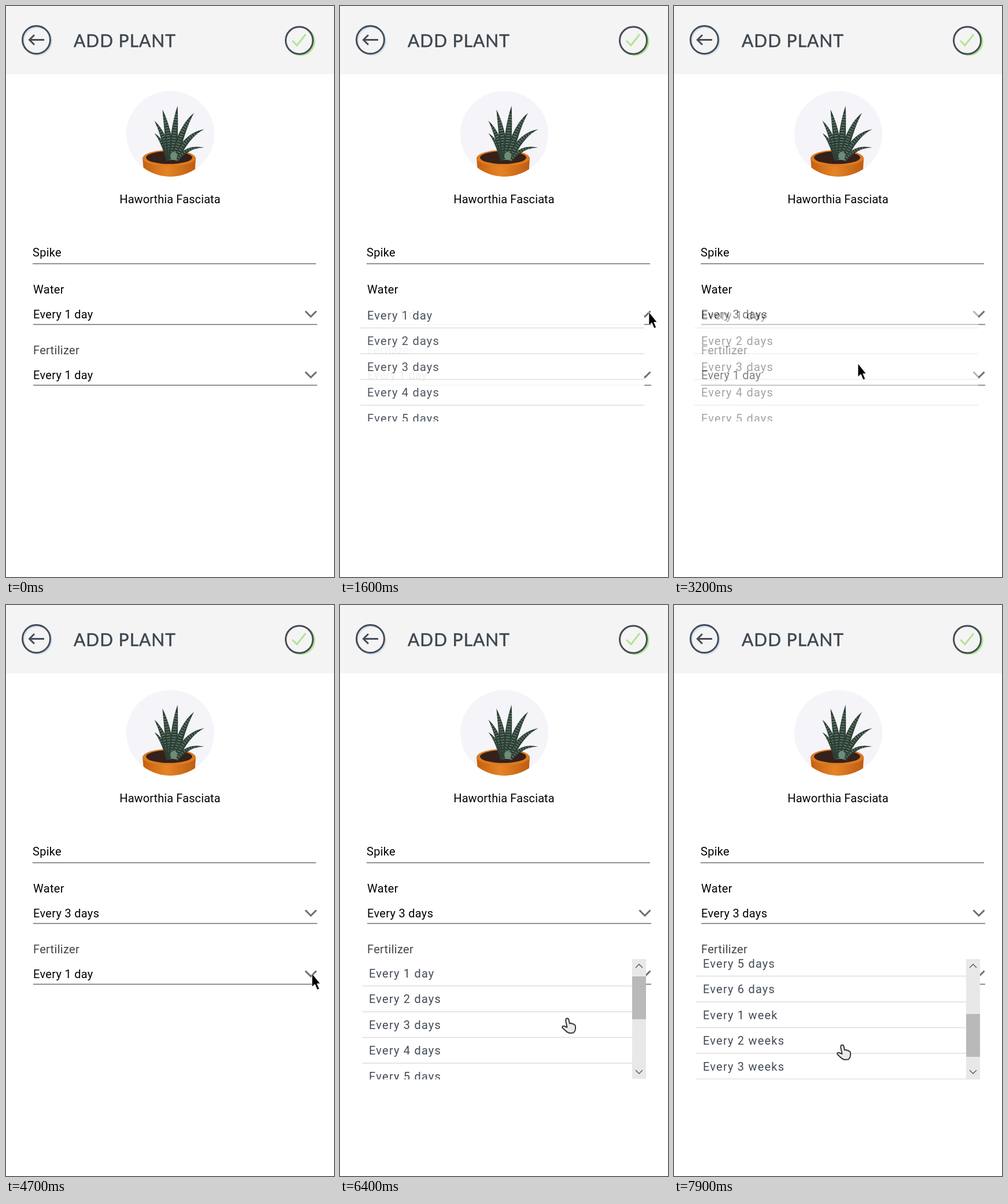
An HTML page for the animation above (8000 ms loop, 567x987 px).

```html
<!DOCTYPE html>
<html lang="en">
<head>
<meta charset="utf-8">
<title>Add plant</title>
<style>
  html, body { margin: 0; width: 100%; height: 100%; overflow: hidden; background: #fff; }
  svg { display: block; width: 100vw; height: 100vh; }
  text { font: 20px Roboto, sans-serif; letter-spacing: .3px; }
  .title { font: 30px Lato, sans-serif; letter-spacing: 1px; fill: #3e4751; stroke: #3e4751; stroke-width: .5; }
  .item { letter-spacing: 1.2px; fill: #434b55; }
  .icon { fill: none; stroke: #454d57; stroke-width: 3; }
  .underline { stroke: #6b6b6b; stroke-width: 1.5; }
  .chevron { fill: none; stroke: #6d6d6d; stroke-width: 3; }
  .bar path { fill: none; stroke: #555; stroke-width: 1.4; }
</style>
</head>
<body>
<svg viewBox="0 0 567 987">
  <defs>
    <clipPath id="photoClip"><ellipse cx="284" cy="221" rx="76" ry="74"/></clipPath>
    <clipPath id="listClip"><rect width="491" height="208"/></clipPath>
    <linearGradient id="clay">
      <stop offset="0" stop-color="#c4600f"/>
      <stop offset=".45" stop-color="#e58426"/>
      <stop offset="1" stop-color="#bd5c12"/>
    </linearGradient>
  </defs>

  <rect width="567" height="987" fill="#fff"/>
  <rect width="567" height="118" fill="#f4f4f4"/>
  <circle class="icon" cx="54.5" cy="60.5" r="24" style="stroke:#d3e2f0"/>
  <circle class="icon" cx="52.5" cy="58.5" r="24"/>
  <path class="icon" d="M66 58.5H41M49 50L40.5 58.5 49 67"/>
  <text class="title" x="117" y="71">ADD PLANT</text>
  <circle class="icon" cx="509.5" cy="61" r="23.5" style="stroke:#aee58c"/>
  <circle class="icon" cx="507" cy="59.5" r="23.5" style="fill:#f4f4f4"/>
  <path class="icon" d="M495 60L503 68 518 49" style="stroke:#b4e292"/>

  <g clip-path="url(#photoClip)">
    <rect x="208" y="147" width="152" height="148" fill="#f4f4f9"/>
    <path d="M236 262H328L326 298H239Z" fill="url(#clay)"/>
    <ellipse cx="282" cy="263" rx="46" ry="14" fill="#dd7a22"/>
    <ellipse cx="282" cy="262" rx="40" ry="11" fill="#35201a"/>
    <g id="leaves"></g>
  </g>
  <text x="283.5" y="341" text-anchor="middle" style="letter-spacing:.1px">Haworthia Fasciata</text>

  <text x="46" y="433">Spike</text>
  <path class="underline" d="M46 445.5H536"/>
  <g id="fields"></g>

  <g id="waterList" transform="translate(35 510)"></g>
  <g id="fertilizerList" transform="translate(38 612)"></g>

  <path id="arrow" d="M0 0V23L5 18.500 9 28 12.500 26.500 8.700 17.500H14Z" stroke="#fff" stroke-width=".7"/>
  <path id="hand" fill="#e9e9e9" stroke="#3a3a3a" stroke-width="2" stroke-linejoin="round"
    d="M9.500 17L7.200 5.500Q7 2 9.300 1.500 11.800 1.200 12.500 4L14 10.500Q16.500 8.800 18 11 20.300 10 21.300 12.500 23.700 12 24 15V20Q23.500 24 20.500 26.500L13.500 27Q9 25.500 6 22L1.200 17.500Q1 14.500 4 14.800Z"/>
</svg>

<script>
const LOOP = 8000, STEP = 100, ROW = 44.5, NOTCH = 97.5;
const byId = id => document.getElementById(id);
const show = (node, visible) => node.setAttribute('display', visible ? 'inline' : 'none');
const move = (node, x, y) => node.setAttribute('transform', `translate(${x} ${y})`);

const progress = (t, start, duration) => Math.min(1, Math.max(0, (t - start) / duration));
const easeInOut = (t, start, duration) => {
  const k = progress(t, start, duration);
  return k * k * (3 - 2 * k);
};
const easeOut = (t, start, duration) => 1 - (1 - progress(t, start, duration)) ** 2;

// A striped leaf rises from the base, then bends outwards; u runs from left to right.
function leaf(u) {
  const angle = (94 * u ** 1.5 - 28) * Math.PI / 180;
  const length = 52 + 42 * Math.sin(Math.PI * u);
  const dx = Math.sin(angle) * length, dy = -Math.cos(angle) * length;
  const x = 281 + 14 * u, y = 266;
  const bendX = x + dx * .4, bendY = y + dy * .6 - Math.abs(dx) * .25;
  const width = 4 + 3 * Math.sin(Math.PI * u);
  const wx = Math.cos(angle) * width, wy = Math.sin(angle) * width;
  return `<path fill="#2c4035" d="M${x - wx} ${y - wy}Q${bendX - wx} ${bendY - wy} ${x + dx} ${y + dy}
      Q${bendX + wx} ${bendY + wy} ${x + wx} ${y + wy}Z"/>
    <path fill="none" stroke="#c3d0c3" stroke-opacity=".5" stroke-width="${width}" stroke-dasharray="1.2 3.4"
      d="M${x} ${y}Q${bendX} ${bendY} ${x + dx * .8} ${y + dy * .85}"/>`;
}
byId('leaves').innerHTML = Array.from({ length: 7 }, (_, i) => leaf(i / 6)).join('') +
  '<ellipse cx="290" cy="259" rx="6" ry="7" fill="#6f8c78"/>';

const every = (n, unit) => `Every ${n} ${unit}${n > 1 ? 's' : ''}`;
const options = Array.from({ length: 9 }, (_, i) => i < 6 ? every(i + 1, 'day') : every(i - 5, 'week'));

function field(label, y, color) {
  return `<g transform="translate(47 ${y})">
    <text fill="${color}">${label}</text>
    <text class="value" y="43">${options[0]}</text>
    <path class="underline" d="M0 53.5H491"/>
    <path class="chevron" d="M470.5 30.5L480 40 489.5 30.5"/>
  </g>`;
}
byId('fields').innerHTML = field('Water', 497, '#000') + field('Fertilizer', 602, '#444');
const waterValue = document.querySelector('.value');

function buildList(id) {
  const root = byId(id);
  root.innerHTML = `<g clip-path="url(#listClip)">
      <rect width="491" height="208" fill="#fff"/>
      <g class="rows">${options.map((label, i) => `
        <text class="item" x="12" y="${31.5 + i * ROW}">${label}</text>
        <path d="M0 ${46.5 + i * ROW}H491" stroke="#dedede" stroke-width="1.5"/>`).join('')}
      </g>
    </g>
    <g class="bar">
      <rect x="467" width="24" height="207" fill="#e8e8e8"/>
      <rect class="thumb" x="467" y="30" width="24" height="74" fill="#b9b9b9"/>
      <path d="M473 15L479 9 485 15M473 192L479 198 485 192"/>
    </g>`;
  const [rows, bar, thumb] = ['.rows', '.bar', '.thumb'].map(s => root.querySelector(s));
  return (opacity, scroll, hovered) => {
    root.setAttribute('opacity', opacity);
    move(rows, 0, -scroll);
    move(thumb, 0, scroll / 3);
    show(bar, hovered);
  };
}
const drawWater = buildList('waterList');
const drawFertilizer = buildList('fertilizerList');

// The pointer eases from stop to stop.
const offstage = { x: 585, y: 546 };
const stops = [
  { start: 300, end: 800, x: 549, y: 537 },
  { start: 1200, end: 1400, x: 534, y: 529 },
  { start: 1900, end: 2900, x: 331, y: 620 },
  { start: 3000, end: 3200, x: 318, y: 618 },
  { start: 3200, end: 3500, x: 403, y: 624 },
  { start: 3600, end: 4700, x: 529, y: 637 },
  { start: 5000, end: 5300, x: 549, y: 640 },
  { start: 5400, end: 5700, x: 534, y: 630 },
  { start: 6000, end: 6200, x: 392, y: 714 },
  { start: 7300, end: 7900, x: 290, y: 760 }
];
const pointerAt = t => stops.reduce((from, { start, end, x, y }) => {
  const k = easeInOut(t, start, end - start);
  return { x: from.x + (x - from.x) * k, y: from.y + (y - from.y) * k };
}, offstage);

function draw(now) {
  const t = Math.floor(now % LOOP / STEP) * STEP;
  const overWater = t >= 2200 && t < 3100, overFertilizer = t >= 6100;
  const pointing = overWater || overFertilizer;
  const { x, y } = pointerAt(t);

  waterValue.textContent = options[t < 3100 ? 0 : 2];
  drawWater(easeInOut(t, 1300, 350) - easeInOut(t, 3000, 400), 0, overWater);
  const scroll = NOTCH * (easeOut(t, 6400, 350) + easeOut(t, 6800, 350));
  drawFertilizer(easeInOut(t, 5500, 350), scroll, overFertilizer);

  move(byId('arrow'), x, y);
  move(byId('hand'), x - 9, y - 1);
  show(byId('arrow'), !pointing);
  show(byId('hand'), pointing);
}

const start = performance.now();
function tick() {
  draw(performance.now() - start);
  requestAnimationFrame(tick);
}
tick();
</script>
</body>
</html>
```
